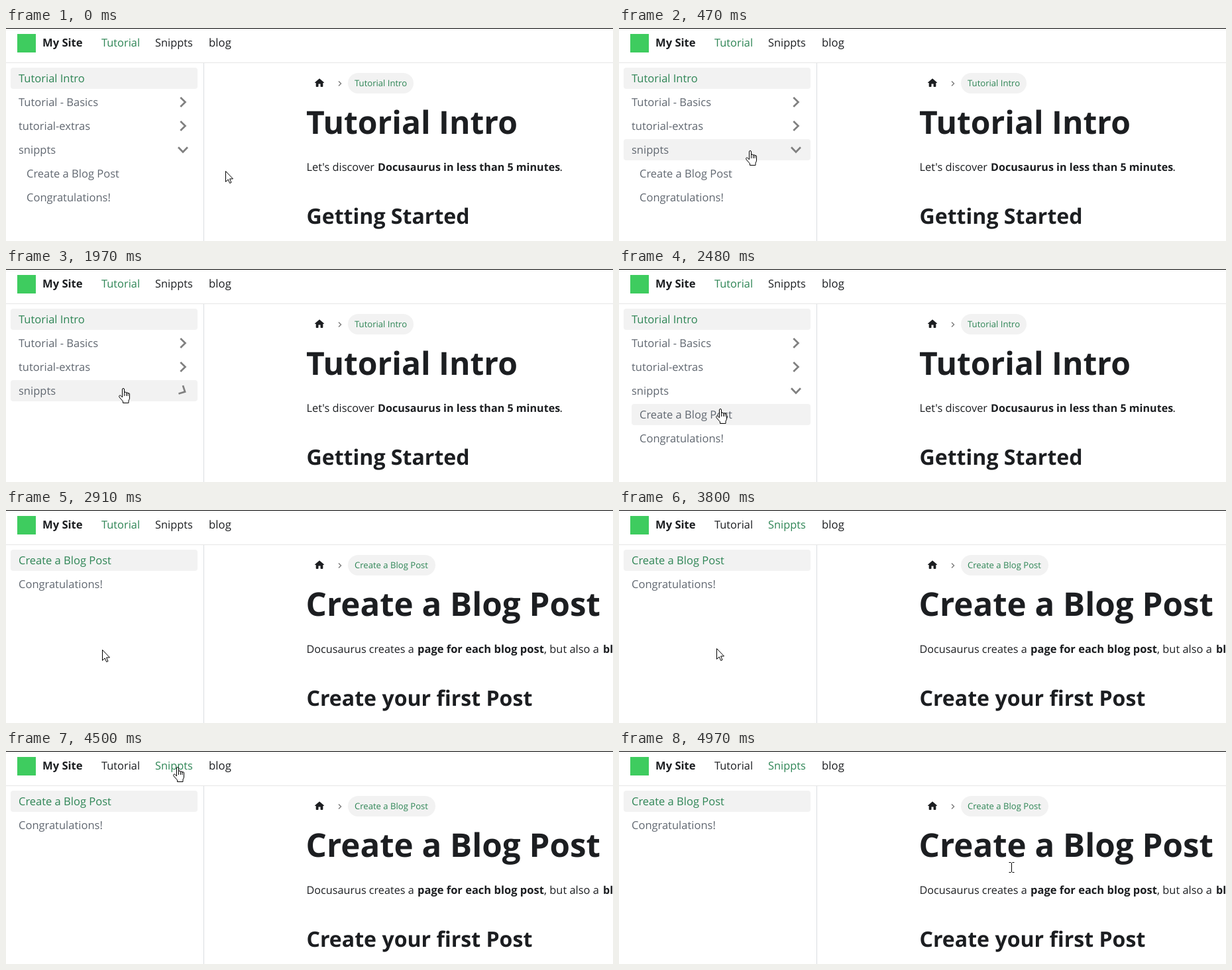
These frames come from a looping animation (916 by 322 pixels, 5.02 s). An HTML page:

```html
<!DOCTYPE html>
<html lang="en">
<head>
<meta charset="utf-8">
<title>Docs sidebar</title>
<style>
html, body { margin: 0; width: 100%; height: 100%; overflow: hidden; background: #fff; }
svg { display: block; width: 916px; height: 322px; }
text { font: 430 16.4px "Open Sans", "Noto Sans", sans-serif; fill: #1c1e21; text-rendering: geometricPrecision; }
.b { font-weight: 700; font-size: 16.1px; }
.h1 { font-weight: 700; font-size: 48px; }
.h2 { font-weight: 700; font-size: 32.1px; }
.side text { fill: #606770; font-size: 16.5px; }
.crumb { font-size: 13.1px; }
.side .on, .on { fill: #2e8555; }
.bg { fill: #f2f2f2; }
.chev { fill: none; stroke: #808080; stroke-width: 2.7; }
#cursor path { fill: #fff; stroke: #000; stroke-linejoin: round; }
</style>
</head>
<body>
<svg viewBox="0 0 916 322">
  <defs>
    <clipPath id="clip"><rect id="fold" y="202" width="298" height="72"/></clipPath>
    <path id="right" d="M-3.7-7L3.5 0L-3.7 7"/>
  </defs>
  <rect width="916" height="1"/>
  <path d="M0 52.5H916" stroke="#e6e6e6"/>
  <path d="M298.5 53V322" stroke="#dadde1"/>
  <rect x="17" y="9" width="28" height="28" fill="#3ecc5f"/>
  <text x="55" y="28" class="b" style="font-size:16.6px">My Site</text>
  <text x="144" y="28" id="navA">Tutorial</text>
  <text x="225" y="28" id="navB">Snippts</text>
  <text x="306" y="28" style="font-size:16.8px">blog</text>

  <rect class="bg" x="7" y="60" width="282" height="32" rx="4"/>
  <rect class="bg" id="hover" height="32" rx="4"/>
  <path fill="#1c1e21" transform="translate(463.9 73.9) scale(.76)" d="M10 19v-5h4v5c0 .55.45 1 1 1h3c.55 0 1-.45 1-1v-7h1.7c.46 0 .68-.57.33-.87L12.67 3.6c-.38-.34-.96-.34-1.34 0l-8.36 7.53c-.34.3-.13.87.33.87H5v7c0 .55.45 1 1 1h3c.55 0 1-.45 1-1z"/>
  <path d="M502 80.5L505.5 84L502 87.5" fill="none" stroke="#808080" stroke-width="1.5"/>

  <g id="intro">
    <g class="side">
      <text x="19" y="82" class="on">Tutorial Intro</text>
      <text x="19" y="118">Tutorial - Basics</text>
      <text x="19" y="154">tutorial-extras</text>
      <text x="19" y="190">snippts</text>
      <g clip-path="url(#clip)">
        <text x="31" y="226">Create a Blog Post</text>
        <text x="31" y="262">Congratulations!</text>
      </g>
    </g>
    <g class="chev">
      <use href="#right" x="267" y="112"/>
      <use href="#right" x="267" y="148"/>
      <use href="#right" id="caret"/>
    </g>
    <rect class="bg" x="516" y="68" width="99" height="31" rx="15.5"/>
    <text x="526" y="88" class="crumb on">Tutorial Intro</text>
    <text x="453" y="160" class="h1">Tutorial Intro</text>
    <text x="453.5" y="216">Let's discover</text>
    <text x="561" y="216" class="b">Docusaurus in less than 5 minutes</text>
    <text x="835.5" y="216">.</text>
    <text x="453.5" y="296" class="h2">Getting Started</text>
  </g>

  <g id="post">
    <g class="side">
      <text x="19" y="82" class="on">Create a Blog Post</text>
      <text x="19" y="118">Congratulations!</text>
    </g>
    <rect class="bg" x="516" y="68" width="132" height="31" rx="15.5"/>
    <text x="526" y="88" class="crumb on">Create a Blog Post</text>
    <text x="452.5" y="160" class="h1" style="font-size:49.3px">Create a Blog Post</text>
    <text x="453.5" y="216" style="font-size:16.2px">Docusaurus creates a</text>
    <text x="621" y="216" class="b" style="font-size:16.5px">page for each blog post</text>
    <text x="812" y="216">, but also a</text>
    <text x="901" y="216" class="b">blog</text>
    <text x="453.5" y="296" class="h2">Create your first Post</text>
  </g>

  <g id="cursor">
    <path id="arrow" d="M.5.5V16.5L4.2 13L6.7 18.6L9 17.6L6.6 12H11.5Z"/>
    <path id="hand" d="M6.5 14V2Q6.5.5 8 .5T9.5 2V7.5Q9.5 6 11 6T12.5 7.5V8Q12.5 6.7 13.8 6.7T15 8V8.8Q15 7.6 16.2 7.6T17.5 9V15Q17.5 17 16 19V22.5H7.5V20L2.2 14Q1 12 2.3 11.2T5 12.3L6.5 14ZM9.5 7.5V12M12.5 8V12M15 8.8V12"/>
    <path id="beam" d="M.5.5H3.5M5.5.5H8.5M4.5 1V15M.5 15.5H3.5M5.5 15.5H8.5"/>
  </g>
</svg>
<script>
const LOOP = 5020, PAGE = 2910;
const $ = id => document.getElementById(id);
const ramp = (t, a, b) => Math.min(1, Math.max(0, (t - a) / (b - a)));
const smooth = p => p * p * (3 - 2 * p);
const mix = (a, b, p) => a + (b - a) * p;
const show = (id, on) => $(id).style.display = on ? "" : "none";

// Cursor moves: start, end, x, y
const start = [331, 216];
const moves = [
  [20, 560, 179, 183], [560, 700, 169, 180], [2180, 2440, 145, 211],
  [3795, 3800, 147, 209], [3800, 4310, 246, 40], [4310, 4500, 251, 24],
  [4670, 4970, 588, 168]
];

function cursorAt(t) {
  let [x, y] = start;
  for (const [a, b, toX, toY] of moves) {
    const p = smooth(ramp(t, a, b));
    x = mix(x, toX, p);
    y = mix(y, toY, p);
  }
  return [x, y];
}

// Sidebar row under the point, as [left, top]
function rowAt(x, y, onPost, open) {
  const rows = onPost ? 2 : open ? 6 : 4;
  const i = Math.floor((y - 60) / 36);
  if (i < 0 || i >= rows || (y - 60) % 36 > 32) return null;
  const left = i > 3 ? 19 : 7;
  return x >= left && x < 289 ? [left, 60 + 36 * i] : null;
}

function fade(id, p) {
  const from = [28, 30, 33], to = [46, 133, 85];
  $(id).style.fill = `rgb(${from.map((c, i) => Math.round(mix(c, to[i], p)))})`;
}

function draw(t) {
  const onPost = t >= PAGE;
  show("intro", !onPost);
  show("post", onPost);

  const active = smooth(ramp(t, PAGE, 3230));
  fade("navA", 1 - active);
  fade("navB", active);

  const open = 1 - smooth(ramp(t, 1230, 1500)) + smooth(ramp(t, 1900, 2200));
  $("fold").setAttribute("height", 72 * open);
  const shut = t < 1220 ? 0 : mix(.28, 1, ramp(t, 1220, 1420));
  const angle = 90 * (1 - shut + smooth(ramp(t, 1890, 2110)));
  $("caret").setAttribute("transform", `translate(267 184) rotate(${angle})`);

  const [x, y] = cursorAt(t), px = x + 5, py = y + 3;
  const row = rowAt(px, py, onPost, open > .5);
  show("hover", row);
  if (row) {
    $("hover").setAttribute("x", row[0]);
    $("hover").setAttribute("y", row[1]);
    $("hover").setAttribute("width", 289 - row[0]);
  }
  const onNav = px > 225 && px < 282 && py < 36;
  const kind = row || onNav ? "hand" : onPost && px > 454 ? "beam" : "arrow";
  for (const k of ["arrow", "hand", "beam"]) show(k, k === kind);
  $("cursor").setAttribute("transform", `translate(${Math.round(x)} ${Math.round(y)})`);
}

function tick() {
  draw(performance.now() % LOOP);
  requestAnimationFrame(tick);
}
tick();
</script>
</body>
</html>
```
